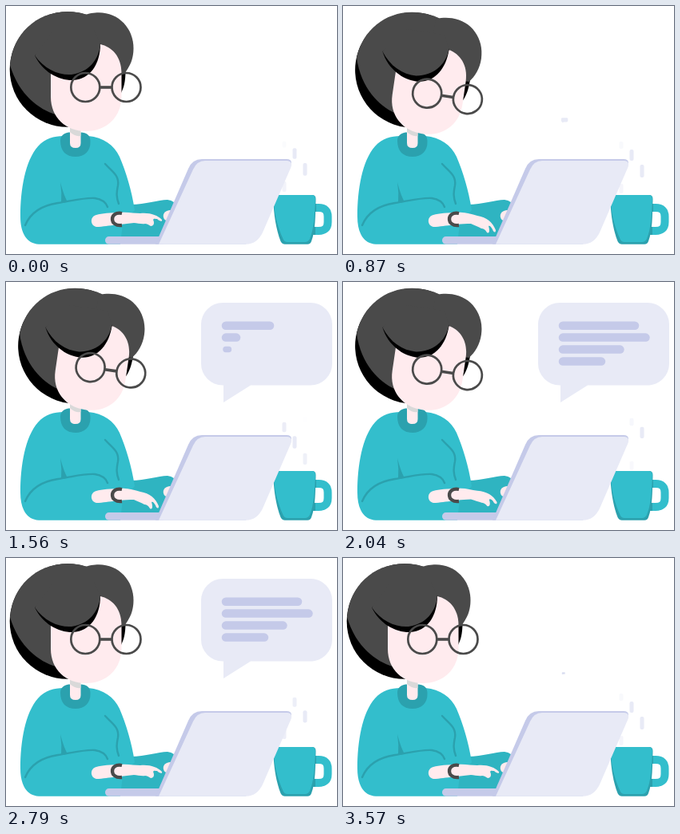
Recreate the animation shown at these times as an HTML page. Size 414 by 311 pixels, loop 3600 ms.

```html
<!DOCTYPE html>
<html lang="en">
<head>
<meta charset="utf-8">
<title>Typing at the laptop</title>
<style>
  html, body { margin: 0; width: 100%; height: 100%; overflow: hidden; background: #fff; }
  svg { display: block; width: 100vw; height: 100vh; }
  .teal { fill: #33becc; }
  .deep { fill: #2ba1ae; }
  .skin { fill: #ffebee; }
  .hair { fill: #4a4a4a; }
  .pale { fill: #e8eaf6; }
  .lilac { fill: #c5cae9; }
  .fold { fill: none; stroke: #2ba1ae; stroke-width: 2.4; stroke-linecap: round; }
  .rim { fill: none; stroke: #4a4a4a; stroke-width: 2.7; }
  #lines path { stroke: #c5cae9; stroke-linecap: round; }
</style>
</head>
<body>
<svg viewBox="0 0 414 311">
  <g id="bubble">
    <path class="pale" d="M271 26H381A27 27 0 0 1 408 53V102.500A27 27 0 0 1 381 129.500H306L272 151V129.500H271A27 27 0 0 1 244 102.500V53A27 27 0 0 1 271 26Z"/>
    <g id="lines"></g>
  </g>

  <g id="steam"></g>

  <!-- far arm -->
  <path d="M156 249C175 249 190 243 202 243Q212 244 212 252L196 290H138Z" fill="#2fb4c1"/>
  <path class="skin" d="M205 256C198 257 196 261 197 265C198 269 201 270 204 269L212 256Z"/>

  <!-- sweater -->
  <path class="teal" d="M41 298.700C26 298 18 285 18 264C18 230 24 194 40 176C49 166 60 163 72 163H103C122 165 135 174 142 189C150 208 157 230 161 256L146 273L143 298.700Z"/>
  <path class="deep" d="M68 169C68 161 75 158.500 80 158.500H94C100 158.500 106 162 105.500 170C106 182 98 189 87 189C75 189 68 182 68 169Z"/>
  <path class="skin" d="M80 150H93.500V172Q93.500 178 87 178Q80 178 80 172Z"/>
  <path d="M80 150H93.500V163Q86 164 80 158Z" fill="#d9d9d9"/>
  <path class="deep" d="M68 221C71 232 73 238 77 246L69 247Q70 234 68 221Z"/>
  <path class="fold" d="M124 198C132 207 142 212 140 225C138 235 138 240 141 248"/>
  <path class="fold" d="M24 275C31 258 45 250 65 247C84 244 99 240 111 241Q124 243 127 252"/>

  <rect class="lilac" x="124" y="289" width="76" height="9.700" rx="4.700"/>

  <!-- near hand -->
  <path class="skin" d="M113 262C120 260 130 259 145 259V274C130 275 125 276 116 277C105 278 104 264 113 262Z"/>
  <path class="skin" id="hand"/>
  <path d="M145 260C129 257 129 277 145 275" fill="none" stroke="#4a4a4a" stroke-width="4.300"/>

  <!-- mug -->
  <path d="M385 253H391Q402.500 253 402.500 264V271Q402.500 282 391 282H383" fill="none" stroke="#33becc" stroke-width="10"/>
  <path class="deep" d="M382 248H388V258H382ZM382 277H387V287H381Z"/>
  <path class="deep" d="M339 237H383Q387.500 237 387.500 242C387 264 387 282 382 295Q381 298.700 377 298.700H349Q345 298.700 343.500 295C338 281 334.500 260 334.500 242Q334.500 237 339 237Z"/>
  <path class="teal" d="M339 237H382Q387 237 387 242C386 264 385 280 380 292Q378 296 374 296H352Q348 296 346.500 292C340 278 335 260 335 242Q335 237 339 237Z"/>

  <!-- laptop -->
  <path class="lilac" d="M187 298.700L228 204Q233 192 245 192H351Q357 192 357 197L300 298.700Z"/>
  <path class="pale" d="M191 298.700L234 205Q239 194 249 194H352Q359 195 356.500 202L321 284Q314 298.700 300 298.700Z"/>

  <g id="head">
    <circle cx="77" cy="79.500" r="72.300"/>
    <path d="M140 78H149.500C149.500 90 149 99 144 109Z"/>
    <path class="hair" d="M5 74C8 36 37 7.200 77 7.200C100 7.200 112 14 125 30L130 80L62 136C42 130 16 112 5 74Z"/>
    <path class="hair" d="M96 12C104 9 110 8.200 116 8.200C141 8.200 159.500 28 159.500 53C159.500 66 155 76 148.500 84H130L96 60Z"/>
    <path class="skin" d="M56 84V114C56 140 75 157 100 157C126 157 144.500 139 144.500 113V84C144.500 63 132 51 118 48L90 70Z"/>
    <path d="M36 62C46 83 66 93.500 84 93C105 92 118 73 118 47L60 40Z"/>
    <path class="hair" d="M36 62C48 79 65 87 82 86C103 83 116 68 118 48L110 30H60Z"/>
    <g id="glasses">
      <circle class="rim" cx="99.300" cy="102" r="18"/>
      <circle class="rim" cx="150.500" cy="102" r="18"/>
      <path class="rim" d="M117.500 102H132.500" style="stroke-width:3.600"/>
    </g>
  </g>
</svg>
<script>
const LOOP = 3600, PUFF = 900;
const $ = id => document.getElementById(id);
const clamp = v => Math.max(0, Math.min(1, v));
const ramp = (t, start, span) => clamp((t - start) / span);
const smooth = v => v * v * (3 - 2 * v);
const ease = (t, start, span) => smooth(ramp(t, start, span));

function add(parent, name, attrs) {
  const el = document.createElementNS('http://www.w3.org/2000/svg', name);
  set(el, attrs);
  parent.append(el);
  return el;
}
function set(el, attrs) {
  for (const k in attrs) el.setAttribute(k, attrs[k]);
}

// piecewise linear lookup in [time, value] pairs
function track(keys, t) {
  if (t <= keys[0][0]) return keys[0][1];
  for (let i = 1; i < keys.length; i++) {
    const [a, u] = keys[i - 1], [b, v] = keys[i];
    if (t <= b) return u + (v - u) * (t - a) / (b - a);
  }
  return keys[keys.length - 1][1];
}

// text lines: y, length, start time
const lines = [[54.8, 90, 1354], [69.6, 103.5, 1481], [84.6, 71.5, 1513], [99.6, 48, 1562]]
  .map(([y, len, start]) => ({ y, len, start, el: add($('lines'), 'path', {}) }));

// steam: each column is a third of a cycle behind the previous one
const puffs = [];
[348, 361, 374].forEach((x, i) => {
  for (const turn of [0, 1]) {
    const el = add($('steam'), 'rect', { x: x - 2.5, width: 5, rx: 2, fill: '#e8eaf6' });
    puffs.push({ el, lag: i * PUFF / 3 - 30, turn });
  }
});
const rise = [[-120, 234], [0, 229], [60, 224], [330, 205], [660, 183], [900, 174.5], [1000, 172]];
const tall = [[-120, 8], [0, 12], [60, 14], [300, 16], [600, 14], [900, 9], [1000, 6]];
const fade = [[-100, 0], [0, .45], [60, .65], [200, 1], [630, 1], [900, .3], [1000, 0]];

const raised = 'M143 259C152 258 160 260 168 260C180 259 189 262 195 268C196 271 192 270 189 267C187 267 185 266 184 268C186 272 185 276 181 276C178 274 176 273 174 273C170 274 164 272 160 272C154 273 148 273 143 274Z';
const pressed = 'M143 259C152 258 160 261 168 263C180 265 187 271 191 281C191 285 188 284 187 280C185 276 183 275 182 276C184 282 183 286 180 284C178 280 175 279 173 279C170 277 164 275 160 273C154 273 148 273 143 274Z';
const goal = pressed.match(/\d+/g);
function handPath(p) {
  let i = 0;
  return raised.replace(/\d+/g, n => (+n + (goal[i++] - n) * p).toFixed(2));
}

function draw(t) {
  const nod = ease(t, 200, 300) - ease(t, 2160, 300);
  const lift = ease(t, 1250, 250) - ease(t, 1600, 250);
  set($('head'), { transform: `rotate(${8.3 * nod} 77 152)` });
  set($('glasses'), { transform: `translate(${-.5 * nod} ${4 * nod - 2.6 * lift})` });

  const typing = ramp(t, 450, 80) - ramp(t, 2090, 80);
  const tap = .5 + .5 * Math.cos((t - 870) / 172.5 * 2 * Math.PI);
  set($('hand'), { d: handPath(typing * tap) });

  const size = ease(t, 830, 300) - ease(t, 3300, 300);
  set($('bubble'), {
    transform: `translate(274.500 146.300) scale(${size}) translate(-274.500 -146.300)`,
    visibility: size > 0 ? 'visible' : 'hidden'
  });

  for (const { y, len, start, el } of lines) {
    const p = ramp(t, start, 360);
    set(el, {
      d: `M275 ${y}h${Math.max(.01, len * smooth(p))}`,
      'stroke-width': 10.5 * clamp(p / .187),
      visibility: p > 0 && size > 0 ? 'visible' : 'hidden'
    });
  }

  for (const { el, lag, turn } of puffs) {
    const age = (t - lag + 120 + LOOP) % PUFF + PUFF * turn - 120;
    const h = track(tall, age);
    set(el, { y: track(rise, age) - h / 2, height: h, opacity: track(fade, age) });
  }
}

const begin = performance.now();
function tick() {
  draw((performance.now() - begin) % LOOP);
  requestAnimationFrame(tick);
}
tick();
</script>
</body>
</html>
```
